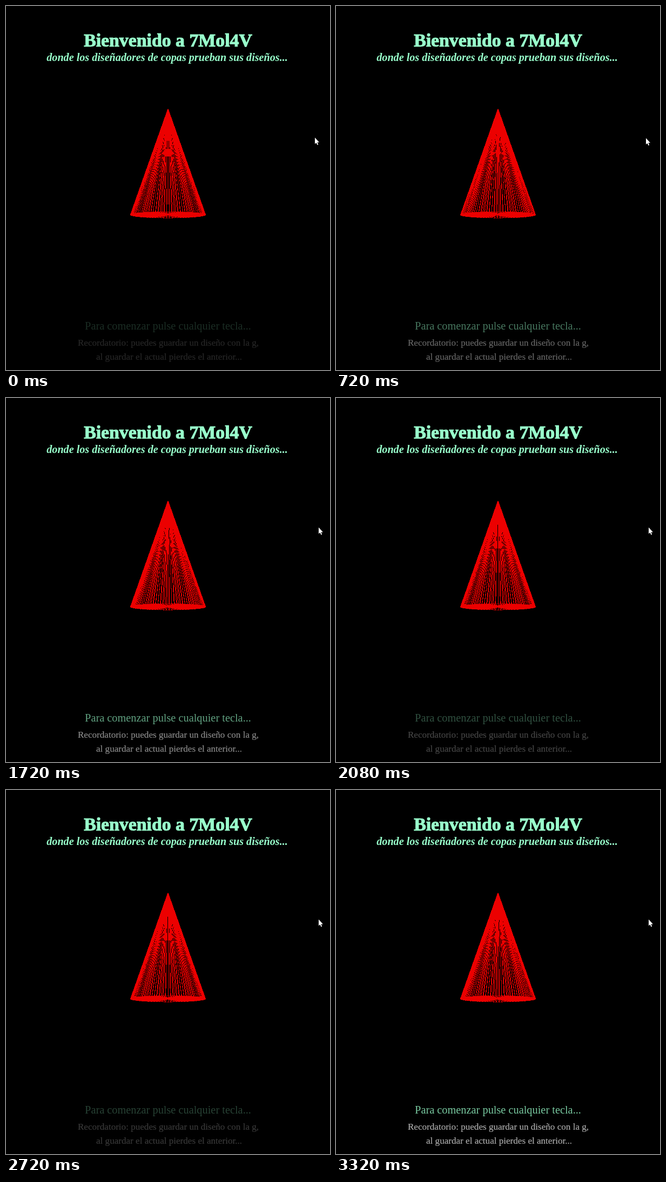
Recreate the animation shown at these times as an HTML page with a canvas. Size 600 by 675 pixels, loop 3360 ms.

```html
<!DOCTYPE html>
<html lang="es">
<head>
<meta charset="utf-8">
<title>Bienvenido</title>
<style>
  html, body { margin: 0; width: 100%; height: 100%; overflow: hidden; background: #000; }
  canvas, svg { position: absolute; left: 0; top: 0; width: 600px; height: 675px; }
  text { font-family: "Liberation Serif", "Times New Roman", serif; text-anchor: middle; }
  .mint { fill: #9fc; }
  .title { font-size: 33.8px; font-weight: 700; stroke: #9fc; stroke-width: 1.1px; }
  .tagline { font-size: 20.15px; font-weight: 700; font-style: italic; }
  .prompt { font-size: 20.35px; }
  .note { font-size: 17.1px; fill: #d8d8d8; stroke: #d8d8d8; stroke-width: .2px; }
  .hint { animation: pulse 3360ms linear infinite; }
  .pointer { fill: #fff; animation: drift 3360ms linear infinite; }
  @keyframes pulse {
    0% { opacity: .174; }
    5.8% { opacity: 0; }
    39.14% { opacity: 1; }
    72.47% { opacity: 0; }
    100% { opacity: .826; }
  }
  @keyframes drift {
    0% { transform: translate(572px, 244px); }
    12%, 24% { transform: translate(574px, 245px); }
    35.7%, 100% { transform: translate(579px, 240px); }
  }
</style>
</head>
<body>
<canvas id="stage" width="600" height="675"></canvas>
<svg viewBox="0 0 600 675">
  <text class="mint title" x="300" y="75">Bienvenido a 7Mol4V</text>
  <text class="mint tagline" x="298.5" y="102">donde los diseñadores de copas prueban sus diseños...</text>
  <g class="hint">
    <text class="mint prompt" x="300" y="600">Para comenzar pulse cualquier tecla...</text>
    <text class="note" x="300.5" y="630">Recordatorio: puedes guardar un diseño con la g,</text>
    <text class="note" x="302" y="656">al guardar el actual pierdes el anterior...</text>
  </g>
  <path class="pointer" d="M0 0V11.8L2.6 9.4L4.5 13.8L6.2 13L4.4 8.8H8Z"/>
</svg>
<script>
  const LOOP = 3360, STEP = 40;
  const WIDTH = 600, HEIGHT = 675;
  const SIDES = 90, RADIUS = 69, EYE = 585;
  const CX = 300, CY = 337.5, APEX_Y = -146.5, BASE_Y = 49;
  const TURN = 1.5 * Math.PI / 180;
  const RED = 0xff0000ec, DIM = 0xff000070; // packed as ABGR

  const ctx = document.getElementById('stage').getContext('2d');
  const image = ctx.createImageData(WIDTH, HEIGHT);
  const pixels = new Uint32Array(image.data.buffer);

  // Perspective projection with the eye EYE pixels in front of the stage
  function project(x, y, z) {
    const k = EYE / (EYE - z);
    return [CX + x * k, CY + y * k];
  }

  // Hard-edged line, one pixel wide
  function line([x0, y0], [x1, y1], color) {
    const dx = x1 - x0, dy = y1 - y0;
    const n = Math.ceil(Math.max(Math.abs(dx), Math.abs(dy), 1));
    for (let i = 0; i <= n; i++) {
      const x = Math.floor(x0 + dx * i / n);
      const y = Math.floor(y0 + dy * i / n);
      pixels[y * WIDTH + x] = color;
    }
  }

  function drawCone(turn) {
    const apex = project(0, APEX_Y, 0);
    const center = project(0, BASE_Y, 0);
    const rim = Array.from({ length: SIDES }, (_, i) => {
      const a = turn + i * 2 * Math.PI / SIDES;
      return project(RADIUS * Math.cos(a), BASE_Y, RADIUS * Math.sin(a));
    });

    pixels.fill(0);
    rim.forEach((p, i) => line(p, rim[(i + 1) % SIDES], DIM));
    for (const p of rim) {
      line(apex, p, RED);
      line(center, p, RED);
    }
    ctx.putImageData(image, 0, 0);
  }

  function tick() {
    const step = Math.floor(performance.now() % LOOP / STEP);
    drawCone(step * TURN);
    requestAnimationFrame(tick);
  }
  tick();
</script>
</body>
</html>
```
